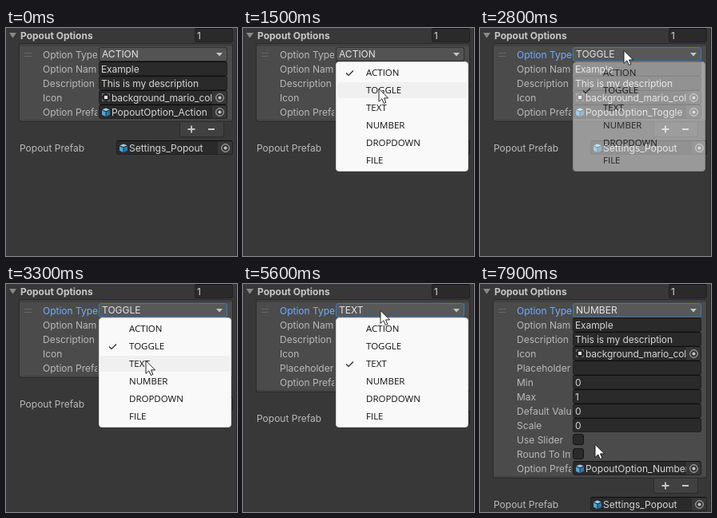
Recreate the animation shown at these times as an HTML page. Size 289 px wide and 286 px high, loop 8 s.

```html
<!DOCTYPE html>
<html lang="en">
<head>
<meta charset="utf-8">
<title>Popout options inspector</title>
<style>
  html, body { margin: 0; width: 100%; height: 100%; overflow: hidden; background: #383838; }
  #stage {
    position: relative; width: 289px; height: 286px; overflow: hidden; isolation: isolate;
    background: #383838; color: #bababa; font: 12px/18px Inter, "Liberation Sans", sans-serif;
    white-space: nowrap; cursor: none;
  }
  #stage::after { content: ""; position: absolute; right: 0; top: 0; width: 1px; height: 100%; background: #2a2a2a; }
  #stage div, #stage svg { position: absolute; box-sizing: border-box; }
  #stage svg { overflow: visible; }
  .title { left: 18px; top: 1px; font-weight: 700; color: #c8c8c8; }
  .list { left: 16px; top: 19px; width: 268px; background: #414141; border: 1px solid #2b2b2b; border-radius: 3px; }
  .item { left: 17px; top: 23px; width: 266px; background: #4b4b4b; }
  .foot {
    left: 217px; width: 56px; height: 19px; background: #414141;
    border: 1px solid #2b2b2b; border-top: 0; border-radius: 0 0 3px 3px;
  }
  .label { left: 46px; width: 68px; height: 18px; line-height: 20px; overflow: hidden; }
  .label.on { color: #78aaf4; width: 70px; }
  .field {
    left: 116px; width: 161px; height: 18px; padding-left: 2px; line-height: 18px; overflow: hidden;
    background: #2a2a2a; border: 1px solid #212121; border-top-color: #0d0d0d; border-radius: 3px; color: #d6d6d6;
  }
  .field.hover { border-color: #656565; }
  .text, .sprite { letter-spacing: -.1px; }
  .drop {
    padding-left: 3px; line-height: 16px;
    background: #535353; border-color: #303030; border-bottom-color: #242424; color: #e4e4e4;
  }
  .drop.on { background: #585858; border-color: #3a79bb; }
  .object { padding-left: 15px; }
  .pick { right: 0; top: 0; width: 18px; height: 16px; background: #373737; }
  .check { left: 116px; width: 14px; height: 14px; background: #2a2a2a; border: 1px solid #151515; border-radius: 3px; }
  .menu, .ghost { left: 116px; color: #111; font: 11.5px/22px "Open Sans", "Noto Sans", sans-serif; }
  .menu { top: 42px; width: 166px; height: 138px; background: #f9f9f9; border: 1px solid #d4d4d4; border-radius: 4px; }
  .option { left: 1px; width: 162px; height: 22px; padding-left: 36px; z-index: 0; }
  .option.hot::before {
    content: ""; position: absolute; z-index: -1; inset: 1px 0; background: #f0f0f0; border-radius: 3px;
  }
  .ghost { width: 163px; height: 22px; padding-left: 37px; line-height: 20px; background: #f0f0f0; border: 1px solid #f9f9f9; }
  #beam { mix-blend-mode: difference; }
</style>
</head>
<body>
<div id="stage"></div>
<script>
const stage = document.getElementById('stage');
const LOOP = 8000, TICK = 100, TOP = 24, ROW = 18;
const OPTIONS = ['ACTION', 'TOGGLE', 'TEXT', 'NUMBER', 'DROPDOWN', 'FILE'];

function add(parent, cls, text = '', style = {}) {
  const el = document.createElement('div');
  el.className = cls;
  el.textContent = text;
  Object.assign(el.style, style);
  parent.append(el);
  return el;
}

function icon(parent, x, y, shapes, id = '') {
  parent.insertAdjacentHTML('beforeend',
    `<svg id="${id}" width="1" height="1" style="left:${x}px;top:${y}px">${shapes}</svg>`);
  return parent.lastElementChild;
}

const path = (d, fill) => `<path d="${d}" fill="${fill}"/>`;
const line = (d, color, w) => `<path d="${d}" fill="none" stroke="${color}" stroke-width="${w}"/>`;

const CUBE = path('M6 1.5L10.5 3.3L6 5.3L1.5 3.3Z', '#8fd3f5') + path('M1 4.2L5.5 6.2V12L1 9.8Z', '#4aa6de') +
  path('M11 4.2L6.5 6.2V12L11 9.8Z', '#2d79ad');
const SPRITE = line('M1.5 4V1.5H4M8 1.5H10.5V4M10.5 8V10.5H8M4 10.5H1.5V8', '#6c6c88', 1) +
  '<rect x="4" y="4" width="4" height="4" fill="#e4e4f0"/>';
const TARGET = '<circle cx="9.5" cy="8.5" r="4.8" fill="none" stroke="#c4c4c4"/><circle cx="9.5" cy="8.5" r="2" fill="#c4c4c4"/>';

function objectField(parent, kind, text, style) {
  const f = add(parent, 'field object ' + kind, text, style);
  icon(f, 2, 2, kind === 'cube' ? CUBE : SPRITE);
  icon(add(f, 'pick'), 0, 0, TARGET);
}

// Each row: label, kind, value
function rowsFor(name, extra) {
  return [
    ['Option Type', 'drop', name.toUpperCase()],
    ['Option Name', 'text', 'Example'],
    ['Description', 'text', 'This is my description'],
    ['Icon', 'sprite', 'background_mario_col'],
    ...extra,
    ['Option Prefab', 'cube', 'PopoutOption_' + name]
  ];
}

function buildForm(rows, focused) {
  const root = add(stage, '');
  const end = TOP + ROW * rows.length;
  add(root, 'list', '', { height: end - 15 + 'px' });
  add(root, 'item', '', { height: end - 22 + 'px' });
  icon(root, 23, 31, line('M0 .5H9M0 4.5H9', '#666', 1));
  add(root, 'foot', '', { top: end + 4 + 'px' });
  icon(root, 232, end + 13, line('M-4.5 0H4.5M0 -4.5V4.5M21 0H29', '#c8c8c8', 1.8));

  const inputs = rows.map(([label, kind, value], i) => {
    const y = TOP + ROW * i, top = y + 'px';
    add(root, 'label' + (focused && !i ? ' on' : ''), label, { top });
    if (kind === 'drop') {
      const f = add(root, 'field drop' + (focused ? ' on' : ''), value, { top });
      icon(f, 146, 6, path('M0 0H8L4 4.5Z', '#c4c4c4'));
    } else if (kind === 'text') {
      return add(root, 'field text', value, { top });
    } else if (kind === 'check') {
      add(root, 'check', '', { top: y + 2 + 'px' });
    } else {
      objectField(root, kind, value, { top });
    }
    return null;
  });

  add(root, '', 'Popout Prefab', { left: '17px', top: end + 28 + 'px' });
  objectField(root, 'cube', 'Settings_Popout', { left: '138px', width: '146px', top: end + 27 + 'px' });
  return { root, inputs };
}

add(stage, 'title', 'Popout Options');
icon(stage, 4, 6, path('M0 0H9L4.5 6.5Z', '#888'));
add(stage, 'field', '1', { left: '236px', top: 0, width: '48px' });

const hint = ['Placeholder', 'text', ''];
const numeric = [
  hint, ['Min', 'text', '0'], ['Max', 'text', '1'], ['Default Value', 'text', '0'],
  ['Scale', 'text', '0'], ['Use Slider', 'check'], ['Round To Int', 'check']
];
const forms = [
  buildForm(rowsFor('Action', []), false),
  buildForm(rowsFor('Toggle', []), true),
  buildForm(rowsFor('Text', [hint]), true),
  buildForm(rowsFor('Number', numeric), true)
];

const menu = add(stage, 'menu');
const items = OPTIONS.map((name, i) => add(menu, 'option', name, { top: 2 + 22 * i + 'px' }));
const tick = icon(menu, 12, 0, line('M0 3.5L3 6.5L9 .5', '#222', 1.1));
const ghost = add(stage, 'ghost');
const arrow = icon(stage, 0, 0,
  '<path d="M0 .3V16.4L3.8 12.9L6.3 18.6L8.9 17.4L6.5 11.9H11.6Z" fill="#fff" stroke="#111" stroke-width=".9"/>', 'arrow');
const beam = icon(stage, 0, 0,
  line('M-2.5 -7.5H-.5M1.5 -7.5H3.5M.5 -7V7M-2.5 7.5H-.5M1.5 7.5H3.5', '#fff', 1), 'beam');

// Pointer moves: first tick, number of steps, x, y
const START = [165, 60];
const MOVES = [
  [1, 5, 176, 36], [7, 2, 176, 31], [12, 4, 170, 76], [17, 4, 180, 28], [30, 4, 175, 96],
  [36, 3, 176, 34], [43, 4, 146, 108], [49, 3, 172, 33], [57, 5, 170, 127], [75, 5, 144, 201]
];
// Menu visits: tick it opens, tick a choice is made
const VISITS = [[8, 17], [27, 36], [54, 65]];

function pointerAt(k) {
  let [x, y] = START;
  for (const [from, steps, tx, ty] of MOVES) {
    if (k < from) break;
    const u = Math.min(1, (k - from + 1) / steps), e = u * u * (3 - 2 * u);
    x += (tx - x) * e;
    y += (ty - y) * e;
  }
  return [Math.round(x), Math.round(y)];
}

const show = (el, on) => { el.style.visibility = on ? 'visible' : 'hidden'; };

function render(k) {
  const [x, y] = pointerAt(k);
  const value = VISITS.filter(v => k >= v[1]).length;
  const visit = VISITS[value];
  const fadeIn = visit ? Math.max(0, Math.min(1, (k - visit[0]) / 2)) : 0;
  const fadeOut = value ? Math.max(0, 0.5 - 0.4 * (k - VISITS[value - 1][1])) : 0;

  forms.forEach((f, i) => show(f.root, i === value));
  menu.style.opacity = fadeIn;
  tick.style.top = 10 + 22 * value + 'px';
  const hot = Math.floor((y - 45) / 22);
  items.forEach((el, i) => el.classList.toggle('hot', i === hot));

  ghost.style.opacity = fadeOut;
  ghost.style.top = 45 + 22 * value + 'px';
  ghost.textContent = OPTIONS[value];

  const row = k > 0 && !fadeIn && x >= 116 && x < 277 ? Math.floor((y - TOP) / ROW) : -1;
  const { inputs } = forms[value];
  inputs.forEach((el, i) => el && el.classList.toggle('hover', i === row));
  const typing = !!inputs[row];
  show(arrow, k > 0 && !typing);
  show(beam, k > 0 && typing);
  for (const c of [arrow, beam]) c.style.transform = `translate(${x}px, ${y}px)`;
}

let last = -1;
const begin = performance.now();
function frame() {
  const k = Math.floor((performance.now() - begin) % LOOP / TICK);
  if (k !== last) render(last = k);
  requestAnimationFrame(frame);
}
frame();
</script>
</body>
</html>
```
